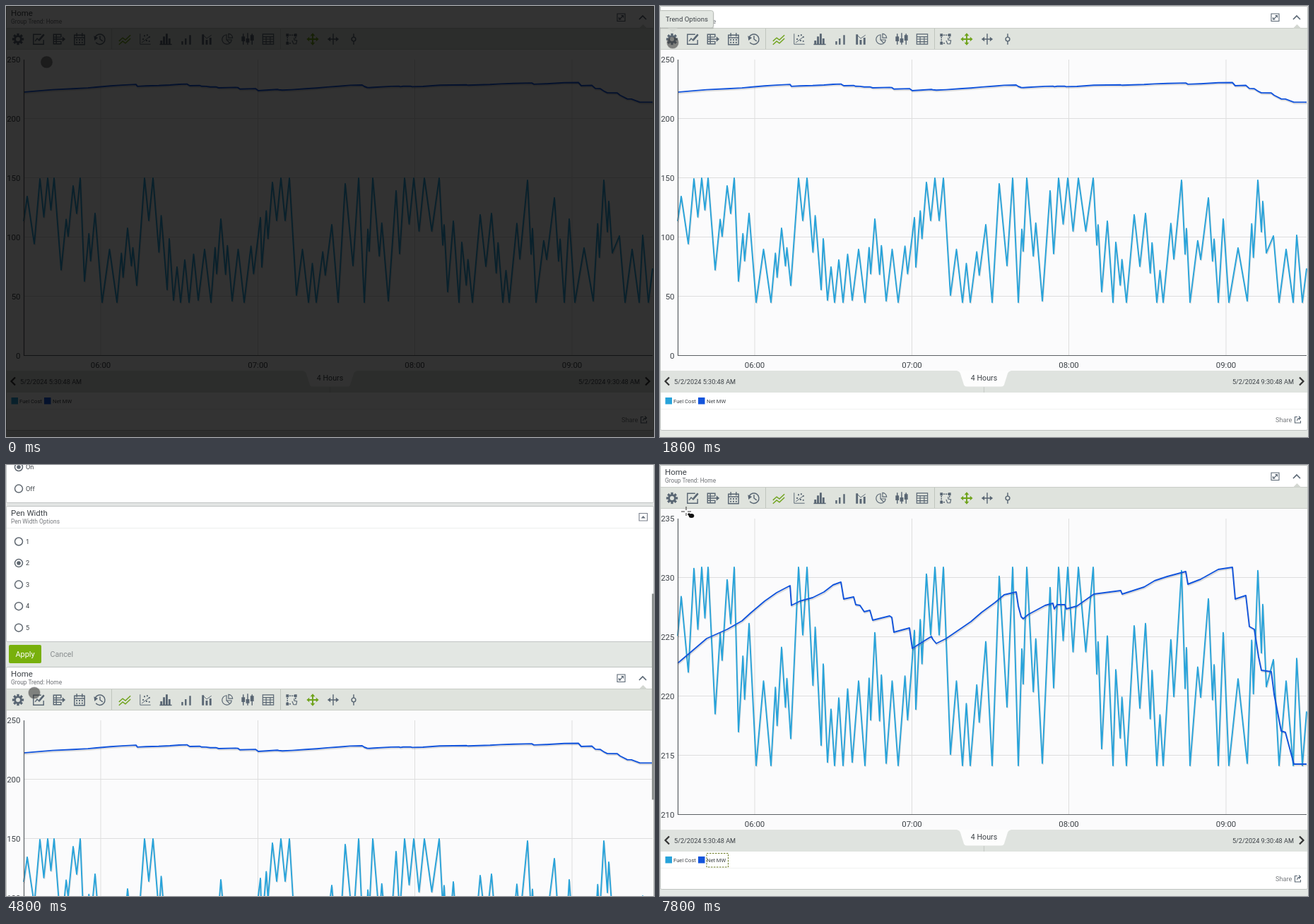
These frames come from a looping animation (917x611 px, 8 s). An HTML page:

```html
<!DOCTYPE html>
<html lang="en">
<head>
<meta charset="utf-8">
<title>Group trend</title>
<style>
html, body { margin: 0; width: 100%; height: 100%; overflow: hidden; background: #e3e7e3; }
svg { display: block; width: 917px; height: 611px; }
text { font-family: Roboto, Arial, sans-serif; fill: #3d4247; }
.icon { fill: none; stroke: #596673; stroke-width: 1.5; }
.icon .solid { fill: #596673; stroke: none; }
.icon.on { stroke: #6fa31c; }
.icon.on .solid { fill: #6fa31c; }
.line { fill: none; stroke-linejoin: round; stroke-width: 1.9; }
.shade { fill: none; stroke: #000; stroke-opacity: .13; stroke-width: 2; transform: translate(.8px, 1.8px); }
.radio { fill: #fff; stroke: #5f6770; stroke-width: 1.5; }
</style>
</head>
<body>
<svg id="stage" viewBox="0 0 917 611" xmlns="http://www.w3.org/2000/svg"></svg>
<script>
const $ = id => document.getElementById(id);
const rect = (x, y, w, h, fill, more = '') =>
  `<rect x="${x}" y="${y}" width="${w}" height="${h}" fill="${fill}" ${more}/>`;
const path = (d, more = '') => `<path d="${d}" ${more}/>`;
const stroke = (d, color, width = 1) => path(d, `fill="none" stroke="${color}" stroke-width="${width}"`);
const text = (x, y, size, s, more = '') => `<text x="${x}" y="${y}" font-size="${size}" ${more}>${s}</text>`;
const solid = d => path(d, 'class="solid"');

// Net MW, in pixels of the zoomed axis
const netPoints = [
  25,281, 45,264, 66,246, 95,233, 116,221, 128,210, 148,193, 165,181, 184,171, 186,199, 198,193,
  216,188, 232,180, 245,170, 256,166, 260,190, 274,187, 277,198, 283,199, 289,208, 297,206, 301,220,
  325,214, 328,216, 331,237, 353,231, 357,260, 384,243, 386,247, 391,253, 405,246, 424,233, 440,222,
  455,209, 474,195, 487,184, 504,180, 507,200, 511,215, 514,218, 521,212, 545,199, 556,196, 558,204,
  562,198, 573,198, 575,204, 590,200, 614,183, 652,178, 654,183, 685,173, 700,164, 718,158, 744,151,
  747,169, 765,162, 790,148, 810,145, 814,190, 829,185, 834,229, 841,233, 847,272, 851,291, 865,293,
  869,325, 879,377, 885,379, 897,424, 915,424];

// Main turning points of Fuel Cost on the common axis
const costPoints = [
  25,305, 30,270, 40,337, 48,245, 59,244, 68,244, 78,374, 95,255, 105,244, 111,390, 126,294, 136,420,
  157,420, 172,315, 185,396, 196,244, 208,244, 228,402, 231,330, 237,417, 247,420, 259,420, 272,417,
  290,420, 304,302, 320,418, 337,420, 360,300, 362,370, 377,250, 389,244, 401,244, 411,410, 428,420,
  439,420, 461,310, 470,420, 480,252, 491,368, 499,244, 507,420, 519,244, 541,418, 552,262, 557,351,
  564,244, 577,244, 592,244, 613,244, 625,405, 633,305, 641,420, 645,335, 660,420, 671,296, 687,294,
  703,420, 712,420, 738,247, 750,420, 776,272, 790,420, 797,302, 805,420, 831,418, 846,247, 858,350,
  868,326, 876,420, 896,420, 901,325, 909,420, 915,372];

const pairs = list => list.flatMap((x, i) => i % 2 ? [] : [[x, list[i + 1]]]);

// Level stretches get a spike towards the middle, long slopes a small reversal
function roughen(points) {
  let seed = 11;
  const random = () => (seed = seed * 16807 % 2147483647) / 2147483647;
  return points.flatMap(([x, y], i) => {
    if (!i) return [[x, y]];
    const [px, py] = points[i - 1], dx = x - px, dy = y - py, added = [];
    if (Math.abs(dy) < 15) {
      const way = y < 332 ? 1 : -1;
      added.push([px + dx * .5, y + way * Math.min(75, dx * 5)]);
    } else if (dx > 11) {
      const kick = Math.sign(dy) * (12 + 16 * random());
      added.push([px + dx * .42, py + dy * .5 + kick], [px + dx * .58, py + dy * .5 - kick]);
    }
    return [...added, [x, y]];
  });
}

const net = pairs(netPoints), cost = roughen(pairs(costPoints));
const trace = (points, scale) => 'M' + points.map(([x, y]) => x + ' ' + scale(y).toFixed(1)).join('L');
const same = y => y;
const netCommon = y => 495.5 - (210 + (495.5 - y) / 16.78) * 1.676;
const costZoomed = y => 145 + (y - 244) * 281 / 176;

const bars = (...heights) => solid(heights.map((h, i) => `M${i * 4 - 8} 8v${-h}h3v${h}z`).join('')) ;
const icons = [
  [17, Array.from({ length: 8 }, (_, i) => path('M0 -5V-8.5', `stroke-width="3.4" transform="rotate(${i * 45})"`)).join('') +
    '<circle r="4.6" stroke-width="3"/>'],
  [46, path('M4 -7H-7.5V7.5H7.5V1M-5 3L-2 -1L1 2L8 -6') + path('M1 1L8 -7', 'stroke-width="2.6"')],
  [75, path('M3 -3V-7H-8V7H3V3M-8 -3H3M-8 0H3M-8 3.5H3M-4 -7V7M0 0H7') + solid('M5 -4L9.5 0L5 4z')],
  [104, path('M-7.5 -6H7.5V8H-7.5zM-7.5 -2H7.5M-4 -9V-4M4 -9V-4') + solid('M-5 0h2v2h-2zM-1 0h2v2h-2zM3 0h2v2h-2zM-5 4h2v2h-2zM-1 4h2v2h-2zM3 4h2v2h-2z')],
  [133, path('M-7 -3A7.5 7.5 0 1 1 -6 5M0 -5V0L4 3') + solid('M-9 -5L-3 -2L-8 2z')],
  [168, path('M-8.5 3L-3 -2L1 1L8.5 -6M-8.5 8L-3 3L1 6L8.5 -1'), 'on'],
  [197, path('M-7.5 -8V7.5H8M-5 5L7 -4', 'stroke-width="1"') + solid('M-4 -1h2v2h-2zM-2 -6h2v2h-2zM2 -7h2v2h-2zM1 1h2v2h-2zM5 2h2v2h-2zM5 -4h2v2h-2z')],
  [226, bars(6, 12, 16, 9) + solid('M-9 7h18v1.5h-18z')],
  [255, solid('M-7 8v-5h2.5v5zM-2 8v-9h2.5v9zM4.500 8v-14h2.500v14z')],
  [284, solid('M-7 8v-15h3v15zM-1.500 8v-7h3v7zM4 8v-10h3v10z') + path('M-5 -6L0 -1L7 -6', 'stroke-width="1"')],
  [313, path('M-1 -6.500A7 7 0 1 0 6.500 1H-1zM2 -8A6.500 6.500 0 0 1 8 -2H2zM-1 1L4 6', 'stroke-width="1.2"')],
  [342, path('M-6.500 -8V8M0 -9V8M6.500 -8V8') + solid('M-9 -4h5v7h-5zM-2.500 -1h5v6h-5zM4 -6h5v8h-5z')],
  [371, path('M-8 -7.500H8V7.500H-8zM-8 -3.500H8M-8 0H8M-8 3.700H8M-3 -4V7M3 -4V7', 'stroke-width="1.200"')],
  [404, path('M-6 -6H6V0M-6 -6V6H0', 'stroke-dasharray="2 1"') + solid('M-8 -8h4v4h-4zM4 -8h4v4h-4zM-8 4h4v4h-4z') + path('M1 2L3 7H7L8 2L4 1V-2', 'stroke-width="1.200"')],
  [434, path('M0 -6V6M-6 0H6', 'stroke-width="2"') + solid('M0 -9L3.500 -5H-3.500zM0 9L3.500 5H-3.500zM-9 0L-5 -3.500V3.500zM9 0L5 -3.500V3.500z'), 'on'],
  [463, path('M0 -8V8M-6 0H6') + solid('M-8.500 0L-4 -3.500V3.500zM8.500 0L4 -3.500V3.500z')],
  [492, path('M0 -8V-3M0 3V8') + '<circle r="3"/>']
];

const hours = [['06:00', 134], ['07:00', 356.5], ['08:00', 578.5], ['09:00', 801]];
const levels = [495.5, 411.5, 327.5, 243.5, 159.5, 76];

function homePanel() {
  const middle = 'text-anchor="middle"', end = 'text-anchor="end"';
  return rect(.5, .5, 916, 601, '#fff', 'rx="2" stroke="#bfc3c1"') +
    text(7, 14, 11.5, 'Home') + text(7, 25, 8.35, 'Group Trend: Home', 'fill-opacity=".75"') +
    rect(1, 31, 915, 31, '#dfe3dd') + stroke('M1 31.500H916M1 61.500H916', '#c9cdc7') +
    path('M896 31.500L901.500 26L907 31.500z', 'fill="#d3d7d1"') +
    stroke('M896 19L901 14L906 19', '#596673', 1.6) +
    stroke('M865 11H876V21.500H865z', '#596673', 1.1) +
    stroke('M870.500 13.500H873.500V16.500M873.500 13.500L868 19M867.500 16V19H870.500', '#596673', 1.1) +
    stroke('M149.500 32V61M388.500 32V61', '#c0c5be') +
    icons.map(([x, art, on = '']) => `<g class="icon ${on}" transform="translate(${x} 47) scale(.96)">${art}</g>`).join('') +
    rect(1, 62, 915, 455, '#fbfbfc') +
    stroke(hours.map(([, x]) => `M${x} 76V495`).join('') + levels.slice(1, 5).map(y => `M26 ${y}H915`).join(''), '#dedede') +
    path('', 'id="costShade" class="shade"') + path('', 'id="costLine" class="line" stroke="#27a3da"') +
    path('', 'id="netShade" class="shade"') + path('', 'id="netLine" class="line" stroke="#1254dc"') +
    stroke('M25.500 76V495.500H915', '#5b5f63', 1.2) +
    levels.map((y, i) => text(20.5, y + 4, 11.46, '', `id="level${i}" ${end}`)).join('') +
    hours.map(([s, x]) => text(x, 512.5, 11.46, s, middle)).join('') +
    rect(1, 517, 915, 31, '#dfe3df') +
    path('M420 517Q424 518 425 521L430 537Q431 539.500 434 539.500H483Q486 539.500 487 537L492 521Q493 518 497 517z', 'fill="#fdfdfd"') +
    stroke('M458.500 540V548', '#c6cac6') + text(458.5, 531, 10.7, '4 Hours', middle) +
    stroke('M13 526.500L7.500 532L13 537.500M905 526.500L910.500 532L905 537.500', '#333', 2.2) +
    text(20, 536, 9.17, '5/2/2024 5:30:48 AM') + text(897, 536, 9.17, '5/2/2024 9:30:48 AM', end) +
    rect(7.5, 555, 9.5, 9.5, '#27a3da') + text(19, 563, 7.64, 'Fuel Cost') +
    rect(54, 555, 9.5, 9.5, '#1254dc') + text(66, 563, 7.64, 'Net MW') +
    rect(66, 550.5, 30.5, 19.5, 'none', 'id="focus" stroke="#6b7a24" stroke-dasharray="2.500 1.500"') +
    stroke('M1 571.500H916', '#f1f2f1') + text(871, 590, 9.17, 'Share', 'fill-opacity=".7"') +
    stroke('M902 582.500H898.500V591H906.500V588M901.500 588Q902 584 906.500 584M904 581.500L906.500 584L904 586.500', '#596673', 1.1);
}

function optionPanel(top, height, title, sub, options, chosen) {
  return rect(.5, top + .5, 916, height, '#fff', 'rx="2" stroke="#c0c3c3"') +
    text(7, top + 14, 11.46, title) + text(7, top + 25, 8.4, sub, 'fill-opacity=".7"') +
    stroke(`M1 ${top + 31.500}H916`, '#eceeed') +
    stroke(`M896 ${top + 10.500}H907.500V${top + 21}H896z`, '#7a808c', 1.1) +
    path(`M898.500 ${top + 17.500}L901.800 ${top + 14}L905 ${top + 17.500}z`, 'fill="#68707c"') +
    options.map((name, i) => {
      const y = top + 50.5 + i * 30.55;
      return `<circle class="radio" cx="18" cy="${y}" r="5.500"/>` +
        `<circle id="${name}" cx="18" cy="${y}" r="2.800" fill="#5f6770" opacity="${+(i === chosen)}"/>` +
        text(28, y + 3.3, 9.17, name);
    }).join('');
}

const optionsPage = rect(0, 0, 917, 668, '#e3e5e4') +
  optionPanel(1.5, 100.5, 'Trend Scale', 'Trend Scale Types', ['Single Scale', 'Multi-Scale'], 0) +
  optionPanel(107, 223, 'Trend Type', 'Trend Line Types',
    ['Default', 'Interpolated', 'Step', 'Symbol', 'Interpolated + Symbol', 'Step + Symbol'], 0) +
  optionPanel(334.5, 100.5, 'Auto Play', 'Control Live Trend Updates', ['On', 'Off'], 0) +
  optionPanel(440, 192, 'Pen Width', 'Pen Width Options', ['1', '2', '3', '4', '5'], 1) +
  rect(0, 633, 917, 35, '#e3e7e3') + rect(4, 637, 46, 26, '#78b00c', 'rx="2"') +
  text(13.5, 653.5, 10.9, 'Apply', 'style="fill:#fff"') + text(62.5, 653.5, 10.7, 'Cancel', 'fill-opacity=".55"');

$('stage').innerHTML = rect(0, 0, 917, 611, '#e3e7e3') +
  `<g id="page"><g id="options">${optionsPage}</g><g id="home">${homePanel()}</g></g>` +
  `<g id="closing">${rect(1, 0, 915, 9, '#fff')}<circle class="radio" cx="18" cy="-4.500" r="5.500"/></g>` +
  rect(914, 0, 3, 292, '#8f9392', 'id="thumb"') +
  `<g id="tip">${rect(-1, 7.5, 77.5, 25, '#000', 'rx="3" opacity=".12"')}
    ${path('M11 31H25L18 37.500z', 'fill="#d5d9d4"')}
    ${rect(-1.5, 6.5, 77, 24.5, '#e3e7e2', 'rx="3" stroke="#b9beb8"')}${text(8, 22.3, 9.6, 'Trend Options')}</g>` +
  `<g id="pointer"><circle id="touch" r="8" fill="#333" fill-opacity=".56" stroke="#666" stroke-opacity=".35" stroke-width="1.500"/>
    <g id="cross">${stroke('M-7 0H-2M2 0H7M0 -7V-2M0 2V6', '#333')}
    <ellipse cx="7.500" cy="6" rx="3.800" ry="3" fill="#111"/><circle cx="4" cy="4" r="1.800" fill="#111"/></g></g>` +
  rect(0, 0, 917, 611, '#000', 'id="dark"');

// Steps: [time, values...], eased between neighbours
const pointerSteps = [
  [0, 57.5, 79.5], [1000, 57.5, 79.5], [1800, 18, 52], [2600, 18, 52], [3200, 18, 83], [3800, 18, 83],
  [4600, 40, 323], [4800, 40, 323], [5200, 32, 274], [6600, 32, 274], [7800, 37, 66]];
const scrollSteps = [[0, 0], [3600, 0], [4600, 382]];

function at(steps, time) {
  const next = steps.findIndex(s => s[0] > time);
  if (next < 0) return steps.at(-1).slice(1);
  const a = steps[next - 1], b = steps[next];
  const p = (time - a[0]) / (b[0] - a[0]), e = p * p * (3 - 2 * p);
  return a.slice(1).map((v, i) => v + (b[i + 1] - v) * e);
}
const show = (id, on) => $(id).setAttribute('visibility', on ? 'visible' : 'hidden');
const move = (id, x, y) => $(id).setAttribute('transform', `translate(${x} ${y})`);

let zoomedNow;
function setScale(zoomed) {
  if (zoomed === zoomedNow) return;
  zoomedNow = zoomed;
  const costPath = trace(cost, zoomed ? costZoomed : same);
  const netPath = trace(net, zoomed ? same : netCommon);
  for (const part of ['Line', 'Shade']) {
    $('cost' + part).setAttribute('d', costPath);
    $('net' + part).setAttribute('d', netPath);
  }
  levels.forEach((_, i) => $('level' + i).textContent = zoomed ? 210 + i * 5 : i * 50);
}

function draw(time) {
  const open = time >= 2600 && time < 5800;
  const closing = time === 5800;
  const [scroll] = open ? at(scrollSteps, time) : [0];
  $('dark').setAttribute('opacity', Math.max(0, .8 - time / 1000));
  move('page', 0, -scroll);
  move('home', 0, open ? 668 : closing ? 9 : 0);
  show('options', open);
  show('closing', closing);
  show('thumb', time >= 3800 && time <= 5000);
  move('thumb', 0, scroll * 611 / 1279);
  show('tip', time >= 1800 && time <= 2600);
  const multi = time >= 3400;
  $('Single Scale').setAttribute('opacity', +!multi);
  $('Multi-Scale').setAttribute('opacity', +multi);
  show('focus', time >= 5800);
  setScale(time >= 6200);
  move('pointer', ...at(pointerSteps, time));
  show('touch', time < 7600);
  show('cross', time >= 7600);
}

function tick() {
  draw(Math.floor(performance.now() % 8000 / 200) * 200);
  requestAnimationFrame(tick);
}
tick();
</script>
</body>
</html>
```
